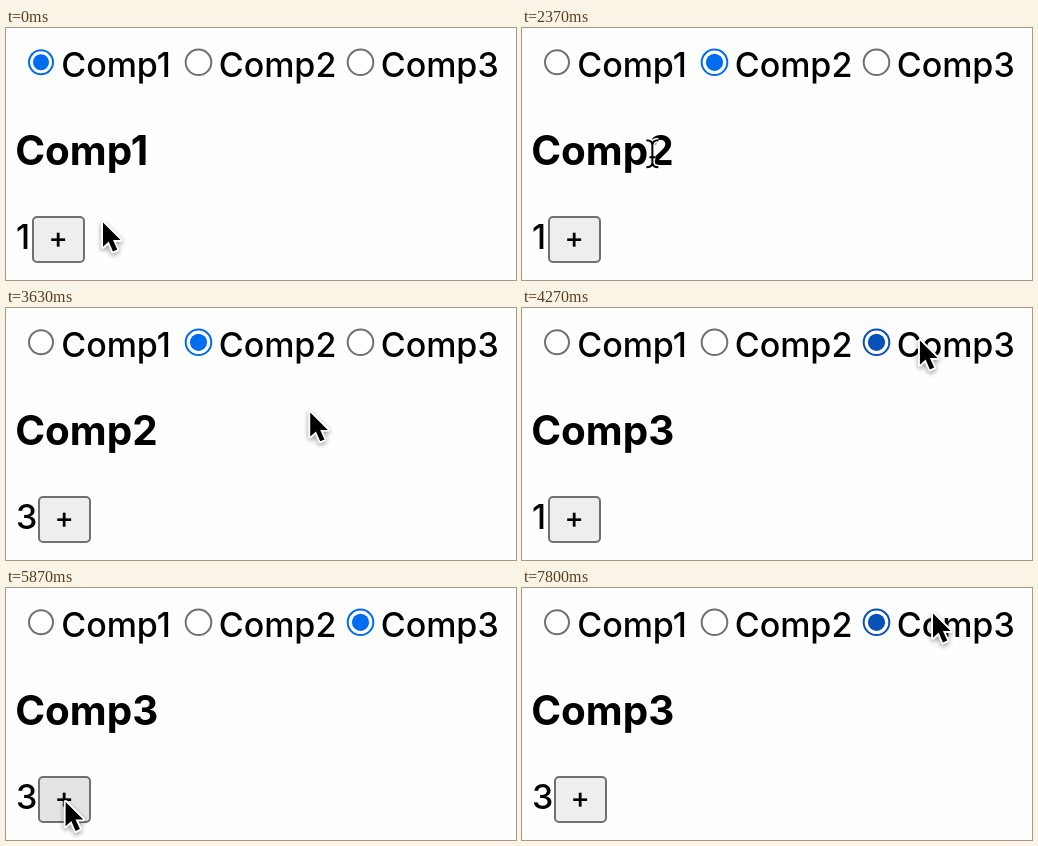
Animation, 510 px wide and 252 px high, one loop 8030 ms. Source, as an HTML page with a canvas:

```html
<!DOCTYPE html>
<html lang="en">
<head>
<meta charset="utf-8">
<title>Component switcher</title>
<style>
  html, body { margin: 0; height: 100%; overflow: hidden; background: #fefefe; }
  canvas { display: block; }
</style>
</head>
<body>
<canvas id="stage" width="510" height="252"></canvas>
<script>
const ctx = document.getElementById('stage').getContext('2d');
const LOOP = 8030;
const FONT = 'Inter, "Liberation Sans", sans-serif';
const GREY = '#707070';

// Each radio knows where the pointer rests on its label
const RADIOS = [
  { x: 35, r: 12, spot: { x: 135, y: 31 } },
  { x: 192.5, r: 12.8, spot: { x: 206, y: 29 } },
  { x: 354.5, r: 12.8, spot: { x: 410, y: 24 } },
];
const BUTTON = { spot: { x: 57, y: 213 } };
const [ONE, TWO, THREE] = RADIOS;
const HOME = { spot: { x: 96, y: 193 } };

const MOVES = [
  { from: 30, to: 270, goal: BUTTON },
  { from: 1070, to: 1690, goal: TWO },
  { from: 2050, to: 2680, goal: BUTTON },
  { from: 3250, to: 3850, goal: THREE },
  { from: 4190, to: 4890, goal: BUTTON },
  { from: 5830, to: 6310, goal: ONE },
  { from: 6560, to: 6990, goal: TWO },
  { from: 7180, to: 7600, goal: THREE },
];

// The button is clicked twice after each arrival, a label once
const CLICKS = MOVES.flatMap(({ to, goal }) =>
  (goal === BUTTON ? [240, 480] : [110]).map(wait => ({ down: to + wait, up: to + wait + 70, goal })));

function pointerAt(t) {
  const i = MOVES.findLastIndex(move => move.from <= t);
  if (i < 0) return HOME.spot;
  const { from, to, goal } = MOVES[i];
  const a = (i ? MOVES[i - 1].goal : HOME).spot, b = goal.spot;
  const u = Math.min(1, (t - from) / (to - from));
  const p = u * u * (3 - 2 * u);
  const rise = b.y < a.y ? p ** 1.5 : p; // upward moves bow sideways
  return { x: a.x + (b.x - a.x) * p, y: a.y + (b.y - a.y) * rise };
}

function stateAt(t) {
  const counts = [1, 1, 1];
  let selected = 0, pressed = false;
  for (const { down, up, goal } of CLICKS) {
    if (t >= down && t < up) pressed = true;
    if (t < up) continue;
    if (goal === BUTTON) counts[selected]++;
    else selected = RADIOS.indexOf(goal);
  }
  return { selected, pressed, count: counts[selected] };
}

const inside = (p, left, top, right, bottom) =>
  p.x > left && p.x < right && p.y > top && p.y < bottom;

function text(str, x, y, size, weight = 450, align = 'left') {
  ctx.font = `${weight} ${size}px ${FONT}`;
  ctx.textAlign = align;
  ctx.fillStyle = '#000';
  ctx.fillText(str, x, y);
}

function circle(x, r) {
  ctx.beginPath();
  ctx.arc(x, 34.3, r, 0, Math.PI * 2);
}

function drawRadio({ x, r }, index, checked, pointer) {
  const hover = inside(pointer, x - 19, 14, x + 138, 56);
  const blue = hover ? '#0650b8' : '#006cf0';
  circle(x, r);
  ctx.fillStyle = '#fff';
  ctx.fill();
  ctx.lineWidth = 2;
  ctx.strokeStyle = checked ? blue : hover ? '#4f4f4f' : GREY;
  ctx.stroke();
  if (checked) {
    circle(x, r * 0.67);
    ctx.fillStyle = blue;
    ctx.fill();
  }
  text('Comp' + (index + 1), x + 20.2, 49, 34);
}

function drawButton(count, pressed, pointer) {
  const x = count === 1 ? 26 : 32;
  const hover = inside(pointer, x, 188, x + 53, 235);
  ctx.beginPath();
  ctx.roundRect(x + 1, 189, 51, 45, 4);
  ctx.fillStyle = !hover ? '#eeeeee' : pressed ? '#f5f5f5' : '#e4e4e4';
  ctx.fill();
  ctx.lineWidth = 2;
  ctx.strokeStyle = GREY;
  ctx.stroke();
  text('+', x + 26.3, 220, 29, 500, 'center');
}

const ARROW = new Path2D('M0 0V25.5L6 20L10.5 30.5L15 28.5L10.5 18.5H18.5Z');
const BEAM = new Path2D('M-6 -13Q0 -13 0 -8Q0 -13 6 -13M0 -8V9M-6 14Q0 14 0 9Q0 14 6 14M-3 4H3');

function drawPointer({ x, y }) {
  ctx.save();
  ctx.translate(x + 1, y + 1.5);
  ctx.lineJoin = 'round';
  ctx.strokeStyle = '#fff';
  ctx.fillStyle = '#000';
  if (inside({ x, y }, 11, 99, 153, 147)) {
    ctx.lineWidth = 5;
    ctx.stroke(BEAM);
    ctx.lineWidth = 2;
    ctx.strokeStyle = '#000';
    ctx.stroke(BEAM);
  } else {
    ctx.scale(0.95, 0.95);
    ctx.lineWidth = 4;
    ctx.shadowColor = 'rgba(0, 0, 0, .4)';
    ctx.shadowBlur = 5;
    ctx.shadowOffsetY = 2;
    ctx.stroke(ARROW);
    ctx.shadowColor = 'transparent';
    ctx.fill(ARROW);
  }
  ctx.restore();
}

function draw(t) {
  const pointer = pointerAt(t);
  const { selected, pressed, count } = stateAt(t);
  ctx.fillStyle = '#fefefe';
  ctx.fillRect(0, 0, 510, 252);
  RADIOS.forEach((radio, i) => drawRadio(radio, i, i === selected, pointer));
  text('Comp' + (selected + 1), 9.2, 137, 40.4, 700);
  text(count, 10, 221, 34);
  drawButton(count, pressed, pointer);
  drawPointer(pointer);
}

const start = performance.now();
function tick() {
  draw((performance.now() - start) % LOOP);
  requestAnimationFrame(tick);
}
tick();
</script>
</body>
</html>
```
